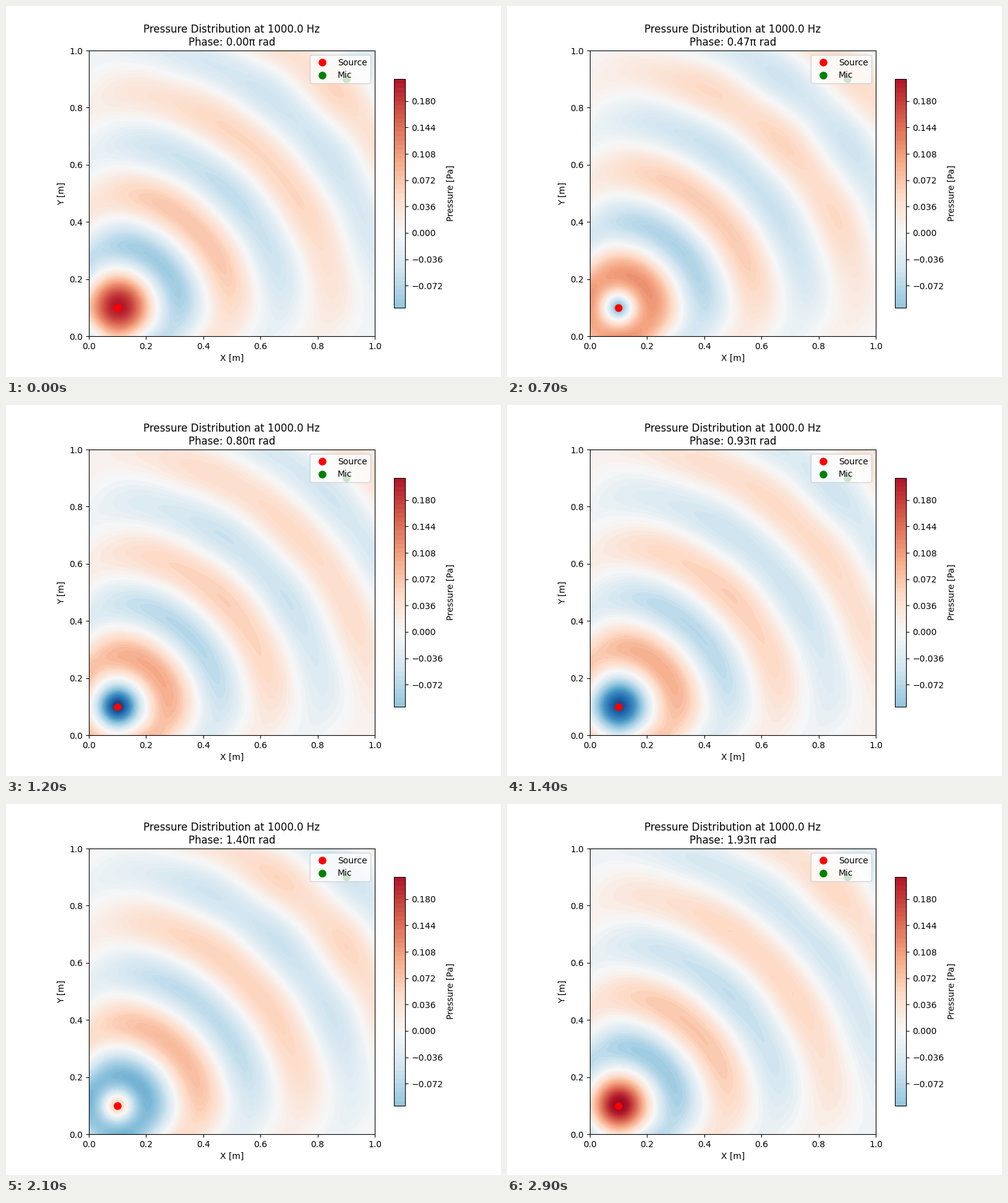
These frames come from a looping animation (800x600 px, 3 s). A matplotlib script:

```python
import numpy as np
import matplotlib.pyplot as plt
from matplotlib.animation import FuncAnimation

FREQ, SPEED = 1000.0, 343.0
SOURCE, MIC = (0.1, 0.1), (0.9, 0.9)
FRAMES, INTERVAL = 30, 100
GRID, SPREAD = 101, 0.022
PEAK, LIMIT = 0.209, 0.258


def solve_field(x, k):
    """Helmholtz field of a compact source in a square with absorbing walls."""
    n, h = len(x), x[1] - x[0]
    lap = (2 * np.eye(n) - np.eye(n, k=1) - np.eye(n, k=-1)).astype(complex) / h**2
    for wall, inner in ((0, 1), (n - 1, n - 2)):
        lap[wall, inner] = -2 / h**2
        lap[wall, wall] += 2j * k / h

    # The operator is separable, so it is inverted in its 1D eigenbasis.
    lam, vec = np.linalg.eig(lap)
    inv = np.linalg.inv(vec)
    gx, gy = (np.exp(-(x - s) ** 2 / (2 * SPREAD**2)) for s in SOURCE)
    rhs = 1j * np.outer(inv @ gy, inv @ gx)
    field = vec @ (rhs / (lam[:, None] + lam[None, :] - k**2)) @ vec.T
    return field * PEAK / field.real.max()


axis = np.linspace(0, 1, GRID)
field = solve_field(axis, 2 * np.pi * FREQ / SPEED)

fig, ax = plt.subplots(figsize=(8, 6), dpi=100)


def draw_contours(phase, levels=50):
    pressure = (field * np.exp(1j * phase)).real
    return ax.contourf(axis, axis, pressure, levels=levels, cmap="RdBu_r",
                       vmin=-LIMIT, vmax=LIMIT)


contours = draw_contours(0, levels=np.arange(-17, 36) * 0.006)
fig.colorbar(contours, ax=ax, shrink=0.8, label="Pressure [Pa]")

ax.plot(*SOURCE, "ro", markersize=8, label="Source")
ax.plot(*MIC, "go", markersize=8, label="Mic")
ax.set(xlim=(0, 1), ylim=(0, 1), xlabel="X [m]", ylabel="Y [m]", aspect="equal")
ax.legend(loc="upper right")


def update(frame):
    global contours
    turn = 2 * frame / FRAMES
    contours.remove()
    contours = draw_contours(turn * np.pi)
    ax.set_title(f"Pressure Distribution at {FREQ} Hz\nPhase: {turn:.2f}π rad")
    return []


anim = FuncAnimation(fig, update, frames=FRAMES, interval=INTERVAL,
                     repeat=True, repeat_delay=0, blit=False)
plt.show()
```
